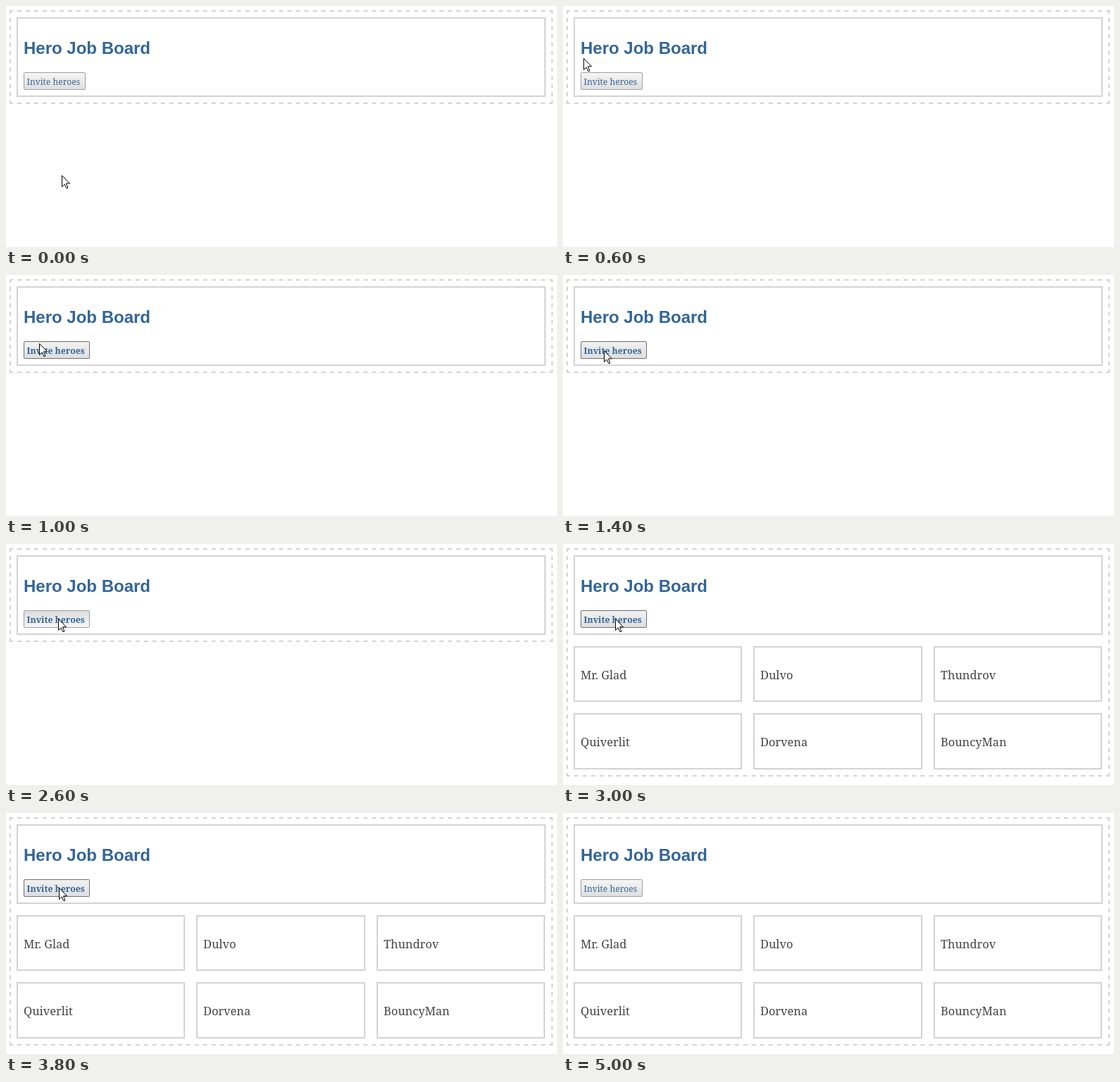
Animation, 782 px wide and 342 px high, one loop 7 s. Source, as an HTML page:

```html
<!DOCTYPE html>
<html lang="en">
<head>
<meta charset="utf-8">
<title>Hero Job Board</title>
<style>
  html, body { margin: 0; width: 100%; height: 100%; overflow: hidden; background: #fff; }
  svg { display: block; }
  .box { fill: none; stroke: #d3d3d3; stroke-width: 2; }
  .title { font: bold 24px "Liberation Sans", Arial, sans-serif; fill: #369; }
  .label { font: 12.1px "Noto Serif", serif; fill: #369; }
  .label.hover { font-weight: bold; font-size: 12.3px; }
  .name { font: 16.4px "Noto Serif", serif; fill: #444; }
</style>
</head>
<body>
<svg width="782" height="342" viewBox="0 0 782 342">
  <defs>
    <linearGradient id="idle" x2="0" y2="1">
      <stop stop-color="#f6f6f6"/><stop offset="1" stop-color="#dedede"/>
    </linearGradient>
    <linearGradient id="hover" x2="0" y2="1">
      <stop stop-color="#f2f2f2"/><stop offset="1" stop-color="#dedede"/>
    </linearGradient>
    <linearGradient id="pressed" x2="0" y2="1">
      <stop stop-color="#dcdcdc"/><stop offset="1" stop-color="#f6f6f6"/>
    </linearGradient>
  </defs>
  <g id="frame"></g>
  <rect class="box" x="16" y="17" width="749" height="111"/>
  <text class="title" x="25" y="68">Hero Job Board</text>
  <rect id="button" x="25.5" y="94.5" height="24" rx="1.5"/>
  <text id="label" class="label" x="29.5" y="112">Invite heroes</text>
  <g id="cards"></g>
  <path id="cursor" d="M.5 .5V16.5L4.2 13L6.7 18.5H8.5V17L6.5 11.8H11.5Z" fill="#fff" stroke="#000"/>
</svg>
<script>
const LOOP = 7000;
const HOVER = 1000, PRESS = 2600, RELEASE = 3000, LEAVE = 5000;

// [time, x, y] of the pointer tip
const pointer = [
  [0, 79, 240], [200, 24, 60], [400, 24, 65], [600, 29, 74], [800, 41, 86],
  [1000, 47, 97], [1200, 52, 102], [1400, 58, 107], [1600, 71, 107],
  [1800, 74, 106], [3800, 75, 106]
];
const heroes = ['Mr. Glad', 'Dulvo', 'Thundrov', 'Quiverlit', 'Dorvena', 'BouncyMan'];

const $ = id => document.getElementById(id);

function add(parent, tag, attrs, text = '') {
  const el = document.createElementNS('http://www.w3.org/2000/svg', tag);
  for (const key in attrs) el.setAttribute(key, attrs[key]);
  el.textContent = text;
  parent.append(el);
  return el;
}

// One dashed side with solid corners, its dashes spread evenly
function dashedSide(x1, y1, x2, y2) {
  const length = Math.hypot(x2 - x1, y2 - y1) - 2;
  const dash = length / Math.round(length / 12) / 2;
  add($('frame'), 'line', {
    class: 'box', x1, y1, x2, y2,
    'stroke-dasharray': dash, 'stroke-dashoffset': dash / 2 - 1
  });
}

function drawFrame(bottom) {
  $('frame').replaceChildren();
  const left = 6, top = 7, right = 775;
  dashedSide(left, top, right, top);
  dashedSide(left, bottom, right, bottom);
  dashedSide(left, top, left, bottom);
  dashedSide(right, top, right, bottom);
  for (const x of [left, right])
    for (const y of [top, bottom])
      add($('frame'), 'rect', { x: x - 1, y: y - 1, width: 2, height: 2, fill: '#d3d3d3' });
}

heroes.forEach((hero, i) => {
  const x = 15 + Math.round(i % 3 * 255.4), y = i < 3 ? 145 : 240;
  add($('cards'), 'rect', {
    class: 'box', x: x + 1, y: y + 1,
    width: i % 3 === 1 ? 238 : 237, height: i < 3 ? 77 : 78
  });
  add($('cards'), 'text', { class: 'name', x: x + 10, y: y + 47 }, hero);
});

let shownBottom;

function render(t) {
  const open = t >= RELEASE;
  const hovered = t >= HOVER && t < LEAVE;
  const pressed = t >= PRESS && t < RELEASE;

  const bottom = open ? 329 : 138;
  if (bottom !== shownBottom) drawFrame(shownBottom = bottom);
  $('cards').style.display = open ? '' : 'none';

  const button = $('button');
  button.setAttribute('width', hovered ? 93 : 87);
  button.setAttribute('fill', `url(#${pressed ? 'pressed' : hovered ? 'hover' : 'idle'})`);
  button.setAttribute('stroke', hovered && !pressed ? '#707070' : '#a0a0a0');
  $('label').classList.toggle('hover', hovered);

  const [, x, y] = pointer.filter(p => p[0] <= t).pop();
  $('cursor').setAttribute('transform', `translate(${x} ${y})`);
  $('cursor').style.display = t < LEAVE ? '' : 'none';
}

const start = performance.now();
function tick() {
  render((performance.now() - start) % LOOP);
  requestAnimationFrame(tick);
}
tick();
</script>
</body>
</html>
```
